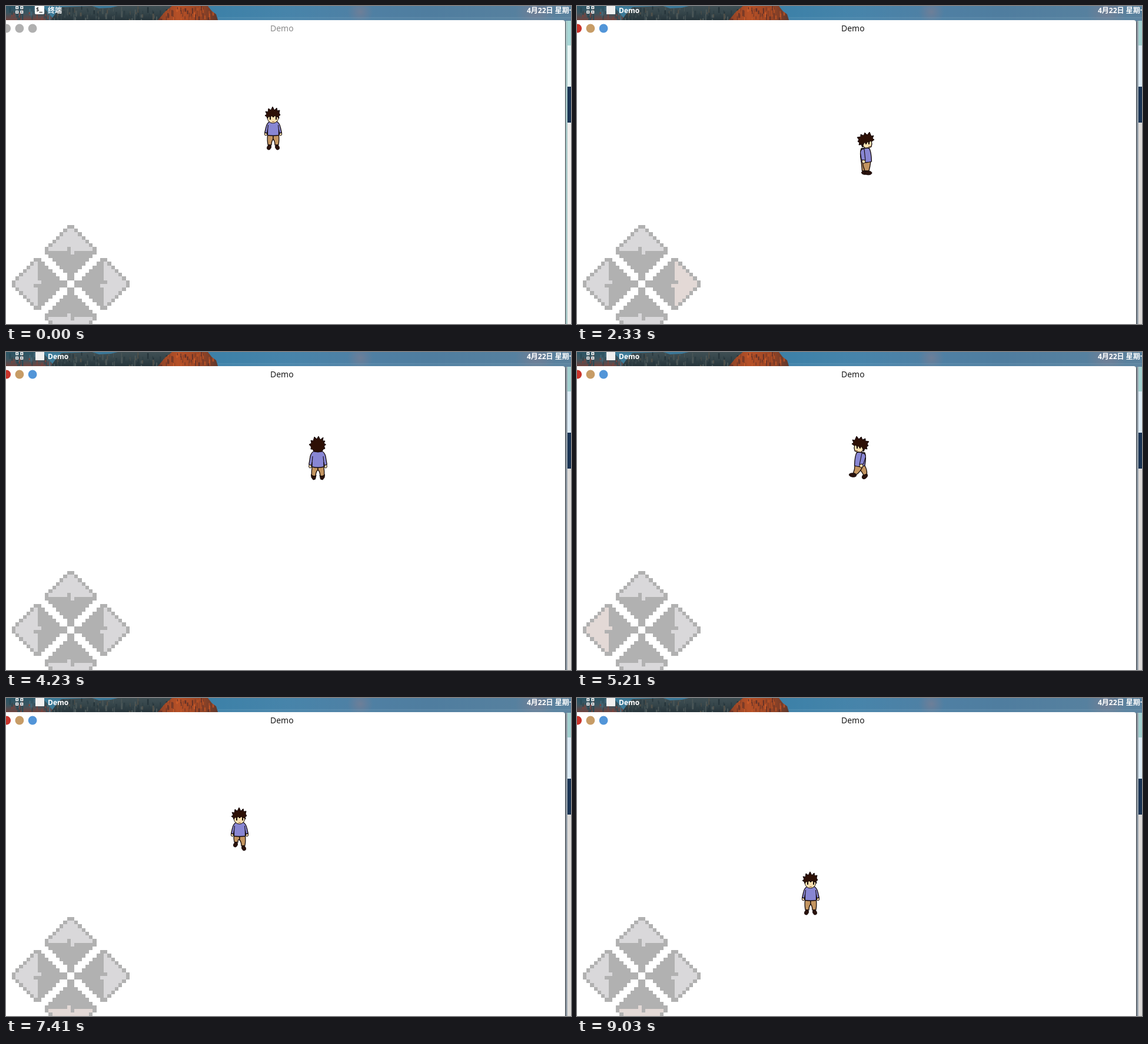
An HTML page with a canvas that plays this animation: 960x540 px, repeating every 9130 ms.

```html
<!DOCTYPE html>
<html lang="zh">
<head>
<meta charset="utf-8">
<title>Demo</title>
<style>
html, body { margin: 0; width: 100%; height: 100%; overflow: hidden; background: #fff; }
canvas { display: block; width: 960px; height: 540px; }
</style>
</head>
<body>
<canvas id="stage" width="960" height="540"></canvas>
<script>
const ctx = document.getElementById('stage').getContext('2d');
const LOOP = 9130, TICK = 40, POSE = 175, ACTIVE = 750;
const INK = '#140a0a', HAIR = '#2d1006', SKIN = '#f9dfae', SHIRT = '#8886d3',
      PANTS = '#c39560', SHOE = '#2a120c', GREY = '#b1b1b1', LIGHT = '#d9d8da', PRESSED = '#e3d9d6';
const UI = '"Noto Sans", "Open Sans", "Noto Sans CJK SC", sans-serif';

// start, end, heading, first and last position, lead of the first step, key release
const WALKS = [
  { t0: 750, t1: 1390, dir: 'down', from: [454, 171], to: [454, 214], lead: 0, up: 1390 },
  { t0: 1810, t1: 2930, dir: 'right', from: [454, 214], to: [530, 214], lead: 40, up: 2930 },
  { t0: 3140, t1: 4190, dir: 'up', from: [530, 214], to: [530, 143], lead: 0, up: 4230 },
  { t0: 4510, t1: 6440, dir: 'left', from: [530, 143], to: [397, 143], lead: 40, up: 6440 },
  { t0: 6810, t1: 9030, dir: 'down', from: [397, 143], to: [397, 295], lead: 40, up: LOOP }
];

function rect(x, y, w, h, fill) {
  ctx.fillStyle = fill;
  ctx.fillRect(x, y, w, h);
}

function shape(d, fill, width = 1.3) {
  const p = new Path2D(d);
  if (fill) { ctx.fillStyle = fill; ctx.fill(p); }
  if (width) {
    ctx.strokeStyle = INK;
    ctx.lineWidth = width;
    ctx.lineJoin = 'round';
    ctx.stroke(p);
  }
}

function oval(x, y, rx, ry, fill, turn = 0, width = 1) {
  ctx.beginPath();
  ctx.ellipse(x, y, rx, ry, turn, 0, 7);
  ctx.fillStyle = fill;
  ctx.fill();
  if (width) { ctx.strokeStyle = INK; ctx.lineWidth = width; ctx.stroke(); }
}

function text(s, x, y, font, fill) {
  ctx.font = font + ' ' + UI;
  ctx.fillStyle = fill;
  ctx.fillText(s, x, y);
}

function blend(x0, y0, x1, y1, colors) {
  const g = ctx.createLinearGradient(x0, y0, x1, y1);
  colors.forEach((c, i) => g.addColorStop(i / (colors.length - 1), c));
  return g;
}

function random(seed) {
  return () => (seed = (seed * 16807) % 2147483647) / 2147483647;
}

function streaks(rnd, n, x0, x1, colors) {
  for (let i = 0; i < n; i++) {
    ctx.fillStyle = colors[Math.floor(rnd() * colors.length)];
    ctx.fillRect(x0 + rnd() * (x1 - x0), rnd() * 22, 1 + rnd() * 2, 3 + rnd() * 9);
  }
}

function clipped(d, draw) {
  ctx.save();
  ctx.clip(new Path2D(d));
  draw();
  ctx.restore();
}

function cloud(x, y, r) {
  const g = ctx.createRadialGradient(x, y, 0, x, y, r);
  g.addColorStop(0, 'rgba(140,125,140,.5)');
  g.addColorStop(1, 'rgba(140,125,140,0)');
  rect(x - r, 0, 2 * r, 24, g);
}

function wallpaper() {
  const rnd = random(71);
  rect(0, 0, 960, 30, blend(0, 0, 960, 0, ['#3d7f9b', '#3c7896', '#38789d', '#3d81a8', '#4784aa', '#4f80a4', '#4f7d9f', '#55809f', '#5a819d']));
  cloud(602, 10, 22);
  cloud(900, 9, 34);
  clipped('M0 0H62L82 24H0Z', () => {
    rect(0, 0, 90, 24, blend(0, 0, 0, 24, ['#2a5566', '#3c5560', '#70443f']));
    streaks(rnd, 45, 0, 80, ['#294a56', '#45697a', '#80423a', '#37474e']);
  });
  clipped('M76 24L86 10L94 2L146 0L158 4L178 3L190 0H284L268 24Z', () => {
    rect(70, 0, 220, 24, blend(0, 0, 0, 24, ['#3f4f54', '#35454a', '#26343a']));
    streaks(rnd, 110, 74, 284, ['#26353b', '#4a5657', '#3a494d', '#2d3d43', '#50504a']);
  });
  clipped('M258 24L270 10L282 0H343L350 9L357 14L360 24Z', () => {
    rect(255, 0, 110, 24, blend(258, 0, 360, 0, ['#8b4226', '#b65027', '#a04724', '#5f372b']));
    streaks(rnd, 65, 258, 358, ['#c95b2a', '#843f27', '#653329', '#b14f26']);
  });
  rect(360, 19, 600, 1, 'rgba(190,215,230,.14)');
  rect(360, 20, 600, 4, 'rgba(125,160,185,.12)');
}

function panel(active) {
  ctx.strokeStyle = '#fff';
  ctx.lineWidth = 1.5;
  for (const x of [17, 25]) {
    for (const y of [1, 8.5]) ctx.strokeRect(x, y, 3.5, 3.5);
  }
  if (active) {
    rect(50, 0, 15, 14, '#f0f0f0');
    text('Demo', 71, 12, 'bold 12px', '#fff');
  } else {
    ctx.fillStyle = '#fff';
    ctx.beginPath();
    ctx.roundRect(49, -3, 16, 17, 2);
    ctx.fill();
    ctx.font = 'bold 9px "Noto Sans Mono", monospace';
    ctx.fillStyle = '#222';
    ctx.fillText('$_', 51, 9);
    text('终端', 71, 11.5, 'bold 12px', '#fff');
  }
  text('4月22日 星期一', 885, 11.5, 'bold 12px', '#fff');
}

function windowFrame(active) {
  rect(951, 25, 9, 515, active ? '#dcdad8' : '#efeeec');
  rect(951, 25, 9, 42, active ? '#a2cfcf' : '#a8d7d6');
  rect(951, 67, 9, 70, active ? '#dcebf5' : '#e7f5f4');
  rect(953, 137, 7, 61, '#1a3454');
  rect(951, 25, 3, 515, active ? blend(951, 0, 954, 0, ['#77838e', '#a9b3bc']) : '#a9c8c8');
  ctx.fillStyle = '#3c4349';
  ctx.beginPath();
  ctx.roundRect(-10, 24, 961, 530, [0, 5, 0, 0]);
  ctx.fill();
  ctx.fillStyle = '#fff';
  ctx.beginPath();
  ctx.roundRect(-10, 24, 960, 530, [0, 4, 0, 0]);
  ctx.fill();
  const dots = active ? ['#c9342b', '#c79c66', '#5295d8'] : ['#b0b0b0', '#b0b0b0', '#b0b0b0'];
  dots.forEach((c, i) => oval(0.7 + i * 22.2, 38, 7.4, 7.4, c, 0, 0));
  text('Demo', 449, 43, '14px', active ? '#1b1b1b' : '#8b8b8b');
}

// One arm of the pad lies on a 32 x 32 grid; the other three are turned copies.
const TURN = {
  up: (x, y) => [x, y],
  left: (x, y) => [y, 31 - x],
  right: (x, y) => [31 - y, x],
  down: (x, y) => [31 - x, 31 - y]
};

function padArm(dir, pressed) {
  const edge = i => Math.ceil(9.5 + i * 6.25);
  const lit = pressed ? PRESSED : LIGHT;
  for (let y = 0; y < 15; y++) {
    const first = y < 7 ? 15 - y : Math.min(15, y + 2);
    for (let x = first; x <= 31 - first; x++) {
      let light = y > 0 && y < 7 && x > first && x < 31 - first;
      if (x === 15 && y === 6) light = false;
      if (x === 16 && y === 7) light = true;
      const [cx, cy] = TURN[dir](x, y);
      rect(edge(cx), edge(cy) + 362, edge(cx + 1) - edge(cx), edge(cy + 1) - edge(cy), light ? lit : GREY);
    }
  }
}

function mirrored(draw) {
  for (const side of [-1, 1]) {
    ctx.save();
    ctx.scale(side, 1);
    draw(side);
    ctx.restore();
  }
}

// The raised foot is the left one in pose 3 and the right one in pose 1.
const lift = (side, pose) => pose === 2 - side ? 6 : 0;

function front(pose) {
  mirrored(side => {
    const foot = 69 - lift(side, pose);
    shape(`M0 48H9.5Q10.5 ${foot - 11} 8.8 ${foot - 4}H3Q3 ${foot - 10} 0 55Z`, PANTS);
    oval(7, foot, 3.2, 4.2, SHOE, -0.45);
    oval(12.5, 46, 2.2, 3, SKIN);
  });
  shape('M-6 25Q-11 28-12.5 36L-14.3 44L-10.5 45L-9.5 39V48.5Q0 50 9.5 48.5V39L10.5 45L14.3 44L12.5 36Q11 28 6 25Z', SHIRT);
  shape('M-8.5 31L-9.5 40M8.5 31L9.5 40', null, 1.1);
  oval(-0.5, 19, 9.3, 9, SKIN);
  shape('M-10 20L-11 17L-14 15L-11 13L-13 8L-9 9L-8 3L-4 6L-1 0L2 6L6 2L7 7L11 6L10 11L12 14L9.5 16L10 20L7 17L5 18L3 15L0 18L-3 15L-5 19L-7 16Z', HAIR, 1);
  rect(-6, 18, 2, 4, INK);
  rect(4, 18, 2, 4, INK);
  rect(-2, 25, 4, 1, '#9b6538');
}

function back(pose) {
  mirrored(side => {
    const up = lift(side, pose);
    shape(`M3 ${66 - up}L11.5 ${65 - up}L11 ${70 - up}L8 ${74 - up}L4.5 ${73 - up}Z`, SHOE, 1);
    shape(`M0 51H9.8Q11 ${60 - up} 10.8 ${66 - up}Q7 ${69 - up} 3.8 ${67 - up}Q3.5 60 0 57Z`, PANTS);
    oval(13.2, 51, 2.2, 3, SKIN);
  });
  shape('M-6 25Q-11 27-13 34L-15.3 48L-11 49.5L-10 45V52Q0 54.5 10 52V45L11 49.5L15.3 48L13 34Q11 27 6 25Z', SHIRT);
  shape('M-9 34L-10 46M9 34L10 46', null, 1.1);
  shape('M-7 26L-9 22L-12 22L-11.5 18L-15 14L-11 12L-12 7L-8 8L-6 1L-2 5L1 0L4 6L9 2L8 8L12 8L10 12L13.5 14L10.5 17L12 21L9 22L7 26Q0 28-7 26Z', HAIR, 1);
}

// Drawn facing left.
function side(pose) {
  const stride = pose % 2 === 1;
  if (stride) {
    oval(8, 68, 5.4, 3.7, SHOE, -0.75);
    shape('M-2 50H8Q12 57 11.5 64L6 66Q3 60-1 56Z', PANTS);
    oval(-12.5, 66, 6.2, 3.2, SHOE, 0.12);
    shape('M-9 50H5Q1 60-6 65L-11.5 62Q-9 57-9 50Z', PANTS);
  } else {
    oval(2, 69, 5.5, 3.2, SHOE);
    shape('M0 50H8L6.5 66H0Z', PANTS);
    oval(-4, 69.5, 6, 3.3, SHOE);
    shape('M-8 50H6Q5 59 2 66H-5Q-7 59-8 50Z', PANTS);
  }
  shape('M-5 27Q-9 32-9.5 50Q0 53.5 8 50Q11 36 8 28Z', SHIRT);
  const reach = pose === 3 ? -4 : stride ? 0 : -2;
  oval(6 + reach, 50, 3, 3.2, SKIN);
  shape(`M3 29Q9 28 9.5 35L${9.8 + reach} 47L${3 + reach} 48Z`, SHIRT, 1.1);
  shape('M-9 14L-10 20L-9 25Q-4 28 2 27L7 22L7 13Z', SKIN);
  shape('M-10 16L-14 13L-11 11L-13 6L-9 7L-6 0L-2 5L2 1L4 6L9 4L9 8L15 9L12 13L14 16L11 18L12 22L8 21L6 26L4 20L2 17L0 21L-3 16L-5 19L-7 15Z', HAIR, 1);
  rect(-6, 17, 2, 4, INK);
  rect(-8, 24, 4, 1, '#9b6538');
}

function actor(x, y, dir, pose) {
  ctx.save();
  ctx.translate(Math.round(x), Math.round(y));
  if (dir === 'right') ctx.scale(-1, 1);
  if (dir === 'down') front(pose);
  else if (dir === 'up') back(pose);
  else side(pose);
  ctx.restore();
}

function stateAt(t) {
  let state = { x: 454, y: 171, dir: 'down', pose: 0, key: null };
  for (const w of WALKS) {
    if (t < w.t0) break;
    const run = Math.floor((t - w.t0) / TICK) * TICK;
    const k = t >= w.t1 ? 1 : Math.min(1, (run + w.lead) / (w.t1 - w.t0 + w.lead));
    state = {
      x: w.from[0] + (w.to[0] - w.from[0]) * k,
      y: w.from[1] + (w.to[1] - w.from[1]) * k,
      dir: w.dir,
      pose: t < w.t1 ? Math.floor(run / POSE) % 4 : 0,
      key: t < w.up ? w.dir : null
    };
  }
  return state;
}

function draw(t) {
  const active = t >= ACTIVE, s = stateAt(t);
  wallpaper();
  panel(active);
  windowFrame(active);
  for (const dir in TURN) padArm(dir, s.key === dir);
  actor(s.x, s.y, s.dir, s.pose);
}

const begin = performance.now();
function frame() {
  draw((performance.now() - begin) % LOOP);
  requestAnimationFrame(frame);
}
frame();
</script>
</body>
</html>
```
